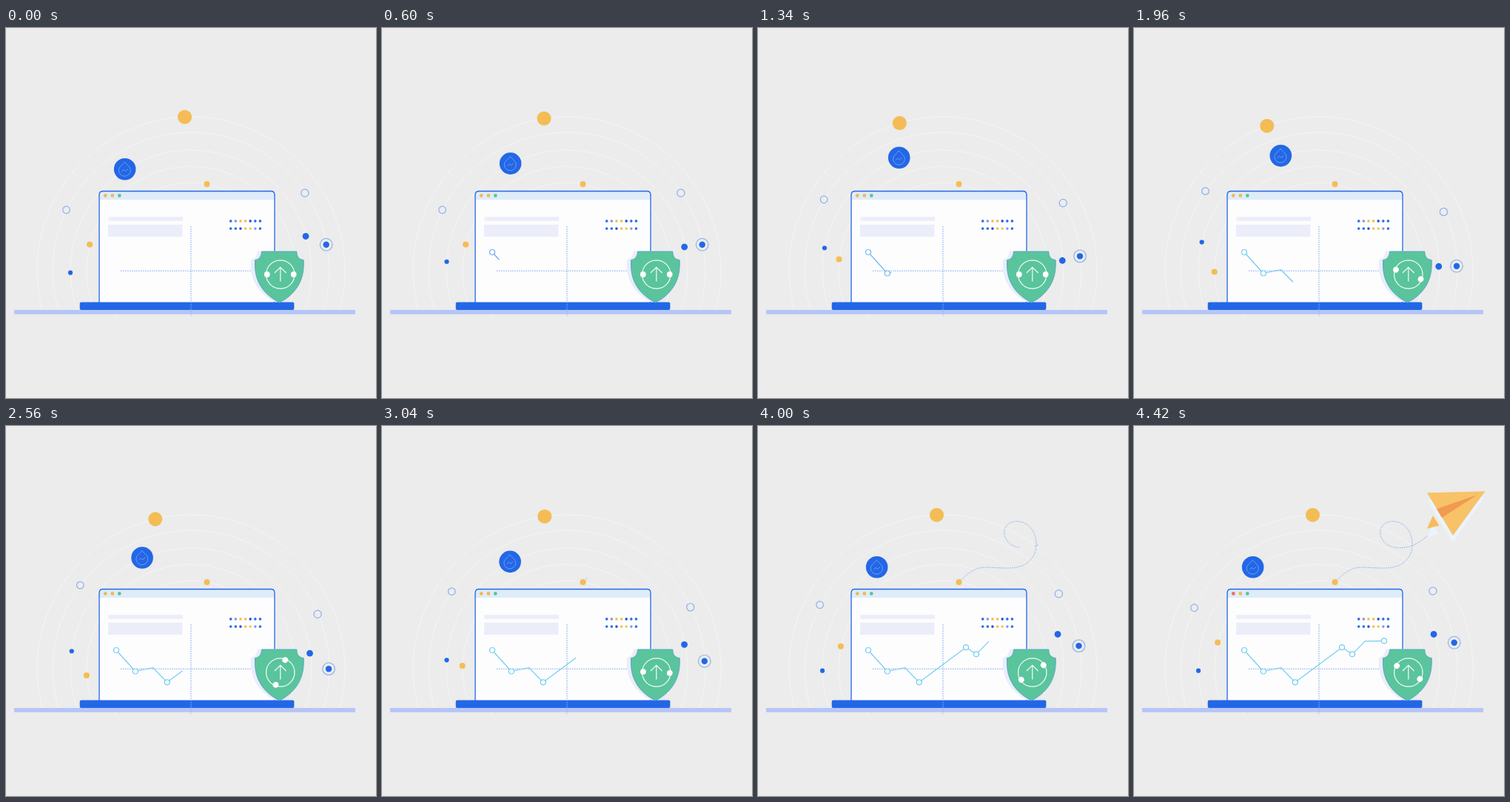
Animation, 500 px wide and 500 px high, one loop 4440 ms. Source, as an HTML page:

```html
<!DOCTYPE html>
<html lang="en">
<head>
<meta charset="utf-8">
<title>Secure growth</title>
<style>
  html, body { margin: 0; width: 100%; height: 100%; overflow: hidden; background: #ebeceb; }
  svg { display: block; width: 100%; height: 100%; }
</style>
</head>
<body>
<svg id="stage" viewBox="0 0 500 500" fill="none">
  <defs>
    <mask id="trailMask" maskUnits="userSpaceOnUse" x="0" y="0" width="500" height="500">
      <use href="#trailPath" id="trailWipe" stroke="#fff" stroke-width="5"/>
    </mask>
    <path id="trailPath" d="M271.5 211C283 199 294 191 307 191C325 191 346 195 361 187C370 181 374 174 375.5 167C378 152 372 132 353 129C339 127.5 330 137 333.5 149C338 164 358 168 375 162C384 158.5 391 153 397 148"/>
    <path id="shieldPath" d="M345.5 302H392.8C393 309 396 313 402.2 313.5V320C402 345 388 362 369.5 371C350 361 336.5 345 336.5 320V313.5C342 313 345 309 345.5 302Z"/>
  </defs>

  <g id="rings" stroke="#f4f5f5"></g>
  <g id="orbs"></g>

  <!-- dotted flight trail and paper plane -->
  <g mask="url(#trailMask)">
    <use href="#trailPath" stroke="#86a9f0" stroke-dasharray="1.6 1.4"/>
  </g>
  <circle cx="271.5" cy="211" r="4" fill="#f4bc55"/>
  <g id="plane">
    <path d="M396 100L474 96L431 158ZM404 132L411.5 146L396 151Z" fill="#ebf3fc"/>
    <path d="M404 121L412.5 134.5L396 138.7Z" fill="#f8bb5a"/>
    <path d="M396 90.2L474.5 88.3L431 148Z" fill="#f8c269"/>
    <path d="M409 112L463.5 93.2L416 124Z" fill="#f19a52"/>
  </g>

  <!-- laptop -->
  <path d="M126 371V225.5Q126 220.5 131 220.5H358Q363 220.5 363 225.5V371Z" fill="#fdfdfe"/>
  <path d="M126 232V225.5Q126 220.5 131 220.5H358Q363 220.5 363 225.5V232Z" fill="#deecfa"/>
  <path d="M126 371V225.5Q126 220.5 131 220.5H358Q363 220.5 363 225.5V371" stroke="#2367e7" stroke-width="1.3"/>
  <circle id="light" cx="134.3" cy="226.5" r="2.4"/>
  <circle cx="143.8" cy="226.5" r="2.4" fill="#f4b94f"/>
  <circle cx="153.3" cy="226.5" r="2.4" fill="#62c39b"/>
  <path d="M138.5 255.2H239V260.8H138.5ZM138 265.7H238.3V282.3H138Z" fill="#ebeef9"/>
  <g id="dots"></g>
  <rect x="11" y="381" width="461" height="5.8" fill="#b6c5f8"/>
  <rect x="99.7" y="370.5" width="289.7" height="10.6" rx="2" fill="#2367e7"/>
  <path d="M155 328.2H338M250 268V389" stroke="#86a9ee" stroke-dasharray="1.7 1.3"/>

  <polyline id="line" stroke-width="1.2" stroke-linejoin="round"/>
  <g id="nodes" fill="#fff" stroke-width="1.2"></g>

  <!-- shield -->
  <use href="#shieldPath" x="-5.7" y="-.5" fill="#e9edfa"/>
  <use href="#shieldPath" fill="#5ac49d" stroke="#5aa6c4"/>
  <g stroke="#f2fcf8" stroke-width="1.2">
    <circle cx="370.8" cy="333" r="19.2"/>
    <path d="M370.8 342.5V323.5M363 331L370.8 323.3L378.6 331"/>
  </g>
  <g id="spinner" fill="#fff">
    <circle cx="352.8" cy="333" r="3.9"/>
    <circle cx="388.7" cy="333" r="3.9"/>
  </g>
</svg>
<script>
const LOOP = 4.44, CX = 250, CY = 328;
const BLUE = '#2367e7', GOLD = '#f4bc55', PALE = '#8fb0ee';
const $ = id => document.getElementById(id);

function add(parent, tag, attrs) {
  const el = document.createElementNS('http://www.w3.org/2000/svg', tag);
  for (const k in attrs) el.setAttribute(k, attrs[k]);
  return parent.appendChild(el);
}
const clamp = v => Math.min(1, Math.max(0, v));
const polar = (r, deg) => {
  const a = deg * Math.PI / 180;
  return [CX + r * Math.cos(a), CY + r * Math.sin(a)];
};
// Linear interpolation through [time, value] pairs.
function track(keys, t) {
  let i = 1;
  while (i < keys.length - 1 && t > keys[i][0]) i++;
  const [t0, v0] = keys[i - 1], [t1, v1] = keys[i];
  return v0 + (v1 - v0) * clamp((t - t0) / (t1 - t0));
}

// Rings, each cut off at its lower edge
for (const [r, left, right] of [[208, 381, 381], [187, 381, 381], [163, 381, 381], [141, 381, 381], [119, 398, 381]]) {
  const x = y => Math.sqrt(r * r - (y - CY) ** 2);
  add($('rings'), 'path', { d: `M${CX - x(left)} ${left}A${r} ${r} 0 1 1 ${CX + x(right)} ${right}` });
}

// Orbs swing out and back along the rings
const ball = (r, fill) => g => add(g, 'circle', { r, fill });
const hoop = r => g => add(g, 'circle', { r, stroke: PALE, 'stroke-width': 1.2 });
const badge = g => {
  ball(14.8, BLUE)(g);
  add(g, 'path', {
    d: 'M-.3 -9.6C2 -6 7.6 -3.5 7.6 1.8A7.9 7.7 0 0 1 -8.2 1.8C-8.2 -3.5 -2.6 -6 -.3 -9.6ZM-4.5 3.3L-1.6 .6L.8 2.7L4 -.2',
    stroke: '#76a2f1', 'stroke-width': .9
  });
};
const target = g => { hoop(8.3)(g); ball(4.2, BLUE)(g); };
const orbs = [
  [ball(9.5, GOLD), 208, -92.34, -19, 0.01],
  [badge, 163.8, -123.06, 16, 0.01],
  [ball(3.1, BLUE), 163, 179.05, 16, 0.01],
  [ball(4.4, BLUE), 161.9, -16.7, 16, 0.01],
  [hoop(4.8), 187.5, 206.02, 12, 0.61],
  [hoop(5.1), 186.3, -34.3, 12, 0.61],
  [target, 186.1, -10.94, 12, 0.61],
  [ball(4, GOLD), 141.4, 194.53, -20, 0.6]
].map(([draw, r, from, sweep, start]) => {
  const g = add($('orbs'), 'g', {});
  draw(g);
  return { g, r, from, sweep, start };
});

// Coloured dot rows: b blue, p purple, o gold, d dark blue, y yellow
const inks = { b: '#2f6de6', p: '#8d93ee', o: '#f4bc55', d: '#2a55cf', y: '#eccb55' };
['bpoodbb', 'bbdoypb'].forEach((row, j) => [...row].forEach((c, i) =>
  add($('dots'), 'circle', { cx: 303.7 + i * 6.62, cy: 260.9 + j * 10.2, r: 1.8, fill: inks[c] })));

// Chart
const pts = [[149, 303], [174.8, 331.5], [198.5, 326.5], [217.8, 346.3], [281, 299.2], [295, 308.3], [312, 290.8], [338, 290.4]];
const dist = [0];
for (let i = 1; i < pts.length; i++)
  dist.push(dist[i - 1] + Math.hypot(pts[i][0] - pts[i - 1][0], pts[i][1] - pts[i - 1][1]));
const full = dist[dist.length - 1];
const drawn = [[0.26, 0], [0.6, 13.8], [1.34, 44], [1.96, 86], [2.56, 116.2], [3.54, 176], [4.36, full]];
const line = $('line');
line.setAttribute('points', pts.join(' '));
const nodes = [0, 1, 3, 4, 5, 7].map(i => ({
  at: dist[i], x: pts[i][0], y: pts[i][1], el: add($('nodes'), 'circle', { r: 3.5 })
}));

const trailLen = $('trailPath').getTotalLength();

function render(t) {
  for (const o of orbs) {
    const k = Math.max(0, 1 - Math.abs(t - o.start - 1.8) / 1.8);
    const [x, y] = polar(o.r, o.from + o.sweep * k);
    o.g.setAttribute('transform', `translate(${x} ${y})`);
  }

  const len = track(drawn, t), k = clamp((t - 0.6) / 1.6);
  const ink = `rgb(${112 + 4 * k},${168 + 37 * k},${236 + 6 * k})`;
  line.setAttribute('stroke', ink);
  line.setAttribute('stroke-dasharray', `${len} ${full + 9}`);
  line.style.display = len > 0 ? '' : 'none';
  $('nodes').setAttribute('stroke', ink);
  for (const n of nodes) {
    const s = t > 4.36 ? 1 : clamp((len - n.at) / 4);
    n.el.style.display = s > 0 ? '' : 'none';
    n.el.setAttribute('transform', `translate(${n.x} ${n.y}) scale(${s})`);
  }

  const trail = track([[3, 0], [3.54, 0.43], [4.2, 1]], t) * trailLen;
  $('trailWipe').setAttribute('stroke-dasharray', `${trail} ${trailLen + 9}`);
  $('trailWipe').style.display = trail > 0 ? '' : 'none';
  $('plane').setAttribute('opacity', clamp((t - 4.12) / 0.24));
  $('light').setAttribute('fill', t > 4.12 ? '#ef6f61' : '#f4b94f');

  $('spinner').setAttribute('transform', `rotate(${150 * Math.max(0, t - 1.823)} 370.8 333)`);
}

const begin = performance.now();
function tick() {
  render((performance.now() - begin) / 1000 % LOOP);
  requestAnimationFrame(tick);
}
render(0);
requestAnimationFrame(tick);
</script>
</body>
</html>
```
